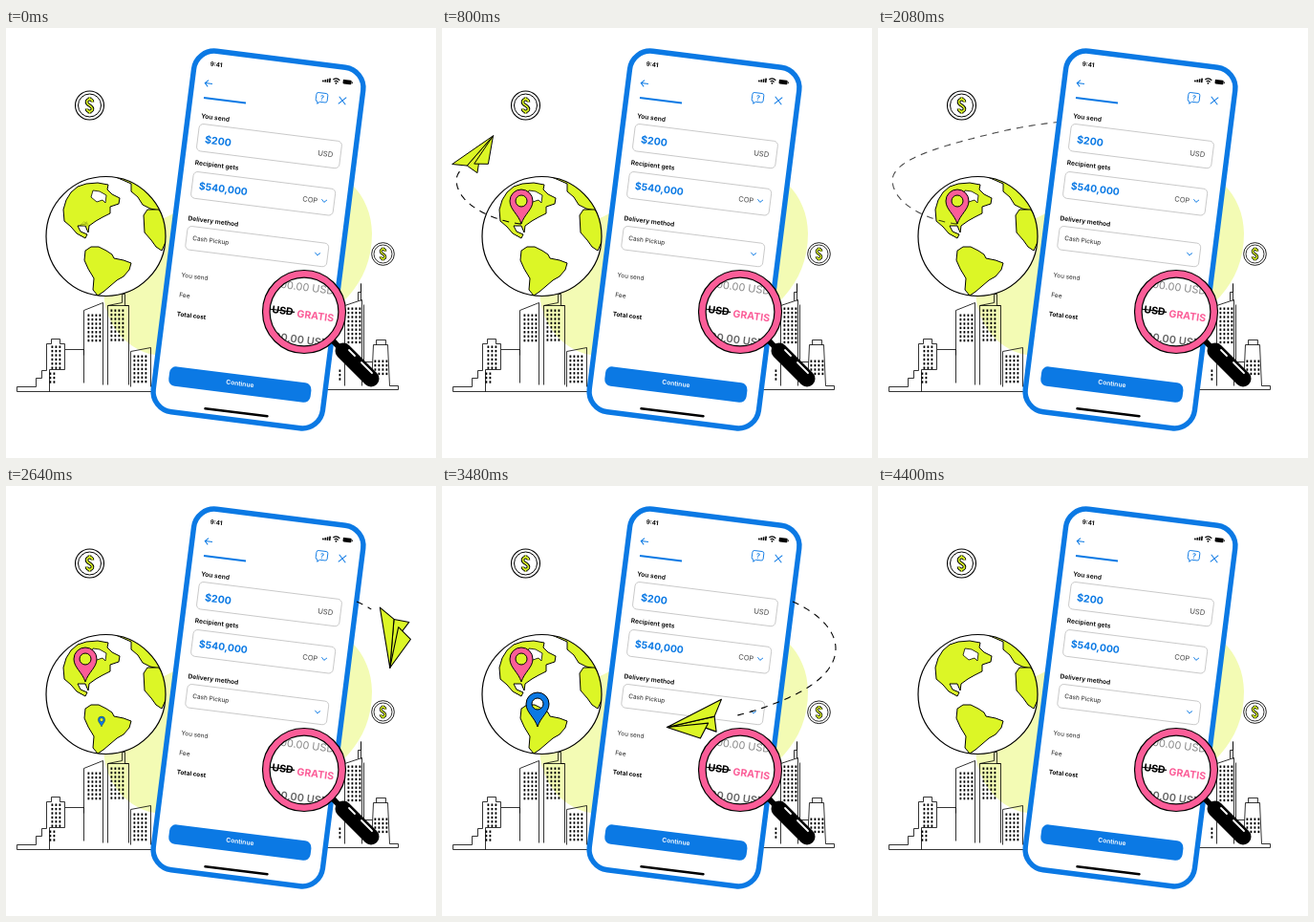
Write an HTML page with a canvas that moves like this. It is 450 px wide and 450 px high and loops after 6 s.

```html
<!DOCTYPE html>
<html lang="en">
<head>
<meta charset="utf-8">
<title>Money transfer</title>
<style>
html, body { margin: 0; width: 100%; height: 100%; overflow: hidden; background: #fff; }
canvas { display: block; width: 450px; height: 450px; }
</style>
</head>
<body>
<canvas id="stage"></canvas>
<script>
const LOOP = 6000;
const BLUE = '#0b79e4', LIME = '#dcf626', PINK = '#fb5d98', PALE = '#f3fbb4', BLACK = '#000';
const TILT = 7.2 * Math.PI / 180;

const canvas = document.getElementById('stage');
const g = canvas.getContext('2d');
const dpr = window.devicePixelRatio || 1;
canvas.width = canvas.height = 450 * dpr;

const clamp = v => Math.max(0, Math.min(1, v));
const ramp = (t, a, b) => clamp((t - a) / (b - a));
const easeOut = u => 1 - (1 - u) ** 3;
const bump = (t, a, b) => Math.sin(Math.PI * ramp(t, a, b)) ** 2;

function at(x, y, angle, scale, draw) {
  g.save();
  g.translate(x, y);
  g.rotate(angle);
  g.scale(scale, scale);
  draw();
  g.restore();
}

function shape(d, fill, line, width = 1, rule = 'nonzero') {
  const p = typeof d === 'string' ? new Path2D(d) : d;
  if (fill) { g.fillStyle = fill; g.fill(p, rule); }
  if (line) { g.strokeStyle = line; g.lineWidth = width; g.stroke(p); }
}

function disc(x, y, r, fill, line, width) {
  const p = new Path2D();
  p.arc(x, y, r, 0, 7);
  shape(p, fill, line, width);
}

function box(x, y, w, h, r, fill, line, width) {
  const p = new Path2D();
  p.roundRect(x, y, w, h, r);
  shape(p, fill, line, width);
}

function label(text, x, y, size, weight, color) {
  at(x, y, TILT, 1, () => {
    g.font = `${weight} ${size}px Inter, sans-serif`;
    g.fillStyle = color;
    g.fillText(text, 0, 0);
  });
}

// Flight path: start time, end time, cubic curve
const legs = [
  [0, 480, 83, 205, 60, 203, 17, 188, 15, 160],
  [480, 1280, 15, 160, 15, 138, 62, 124, 130, 108],
  [1280, 2400, 130, 108, 210, 90, 310, 90, 367, 121],
  [2400, 2730, 367, 121, 392, 132, 412, 150, 412, 170],
  [2730, 3120, 412, 170, 412, 192, 390, 212, 347, 228],
  [3120, 3880, 347, 228, 302, 246, 234, 256, 182, 251],
  [3880, 4260, 182, 251, 150, 252, 125, 251, 100, 250]
];
const HIDDEN = 2400, FRONT = 2700, LANDED = 4260;
const headings = [[0, -175], [300, -140], [480, -80], [800, -33], [1280, 0],
  [2400, 35], [2730, 95], [3120, 143], [3880, 160], [4260, 165]];

function place(t) {
  const [a, b, ...c] = legs.find(l => t <= l[1]) || legs[legs.length - 1];
  const u = ramp(t, a, b), v = 1 - u;
  const mix = i => v * v * v * c[i] + 3 * u * v * v * c[i + 2] + 3 * u * u * v * c[i + 4] + u * u * u * c[i + 6];
  return [mix(0), mix(1)];
}

function heading(t) {
  const i = Math.max(1, headings.findIndex(k => k[0] >= t));
  const [t0, a0] = headings[i - 1], [t1, a1] = headings[i];
  return (a0 + (a1 - a0) * ramp(t, t0, t1)) * Math.PI / 180;
}

function trail(from, to, alpha) {
  if (to <= from || alpha <= 0) return;
  g.save();
  g.globalAlpha = alpha;
  g.setLineDash([7, 6]);
  g.lineWidth = 1.1;
  g.strokeStyle = BLACK;
  g.beginPath();
  for (let t = from; t < to; t += 10) g.lineTo(...place(t));
  g.lineTo(...place(to));
  g.stroke();
  g.restore();
}

function plane(t) {
  const size = Math.min(1, 0.15 + 0.00083 * t) * (1 - ramp(t, 3770, 4280));
  at(...place(t), heading(t), size, () => {
    if (t > 1950) g.scale(1, -1);
    g.lineJoin = 'round';
    shape('M34-13L-15 1L-9 16L-1 7Z', LIME, BLACK, 1.1);
    shape('M34-13L-6 4L9 14Z', LIME, BLACK, 1.1);
    shape('M34-13L-30-11L-15 1Z', LIME, BLACK, 1.1);
  });
}

function pin(x, y, scale, color) {
  if (scale <= 0) return;
  at(x, y, 0, scale, () => {
    shape('M0 0C-3-10-12-15-12-24A12 12 0 1 1 12-24C12-15 3-10 0 0ZM6-24A6 6 0 1 0-6-24A6 6 0 1 0 6-24Z',
      color, BLACK, 1, 'evenodd');
  });
}

function coin(x, y, scale) {
  const dollar = 'M3-3.6C3-7.2-3-7.2-3-3.6C-3 0 3 0 3 3.6C3 7.2-3 7.2-3 3.6M0-8.6V-6M0 6V8.6';
  at(x, y, 0, scale, () => {
    disc(0, 0, 15, '#fff', BLACK, 1.1);
    disc(0, 0, 12, null, BLACK, 1);
    shape(dollar, null, BLACK, 3.6);
    shape(dollar, null, LIME, 1.7);
  });
}

function windows(x, y, cols, rows, dx = 4, dy = 4.4) {
  g.fillStyle = BLACK;
  for (let r = 0; r < rows; r++)
    for (let c = 0; c < cols; c++) g.fillRect(x + c * dx, y + r * dy, 1.8, 2.4);
}

function city() {
  at(-0.5, -0.5, 0, 1, () => {
    shape('M155 381H12V376H32V367H38V359H43V331H48V326H57V331H62V337H82V343M62 337V358H46V381' +
      'M82 372V296L102 288V374M107 374V291L122 288V279H125V291H129V374M107 291H129' +
      'M131 376V339L152 335V376', null, BLACK, 0.8);
    shape('M335 379H411V375H402L400 332H385L383 375M355 375V291L373 285V375M369 286V277H372V268V286' +
      'M375 290V350H384M388 332V327H398V332', null, BLACK, 0.8);
    windows(48, 333, 3, 6);
    windows(46, 361, 2, 3);
    windows(86, 300, 4, 7);
    windows(110, 295, 4, 8);
    windows(134, 343, 4, 7);
    windows(358, 293, 4, 9);
    windows(349, 358, 1, 3);
    windows(386, 348, 4, 4);
  });
}

function globe() {
  g.save();
  disc(104.5, 218, 62.5, '#fff');
  g.beginPath();
  g.arc(104.5, 218, 62.5, 0, 7);
  g.clip();
  g.lineJoin = 'round';
  shape('M61 202L60 190L63 180L68 172L75 166L84 163L96 162L107 164L106 169L111 174L119 178L118 184' +
    'L109 187L109 194L101 198L94 202L87 207L86 214L83 207L75 207L78 213L85 216L83 220L74 215L68 208Z', LIME, BLACK, 1);
  shape('M91 170L89 177L95 182L101 180L104 183L105 175L98 171Z', '#fff', BLACK, 0.8);
  shape('M83 233L89 229L97 229L105 233L111 237L113 241L123 243L131 246L129 253L123 260L116 264' +
    'L109 270L102 276L96 280L91 274L92 262L86 252L82 243Z', LIME, BLACK, 1);
  shape('M110 154L122 159L131 163L131 171L138 177L143 185L151 189L160 191L168 200V180L145 156Z', LIME, BLACK, 1);
  shape('M144 196L148 190L160 190L168 203V222L163 233L157 229L152 222L145 214Z', LIME, BLACK, 1);
  g.restore();
  disc(104.5, 218, 62.5, null, BLACK, 1.2);
}

function field(x, y, w, h) {
  at(x, y, TILT, 1, () => box(0, 0, w, h, 4.5, null, '#aaa', 0.6));
}

function chevron(x, y) {
  at(x, y, TILT, 1, () => shape('M-2.8-1.4L0 1.4L2.8-1.4', null, BLUE, 0.9));
}

function phone() {
  at(264, 221.5, TILT, 1, () => box(-89.3, -190.3, 178.6, 380.6, 21.5, '#fff', BLUE, 5.4));

  label('9:41', 213.5, 39.5, 6.2, 700, BLACK);
  at(331, 56, TILT, 1, () => {
    g.fillStyle = BLACK;
    for (let i = 0; i < 4; i++) g.fillRect(i * 2.3, -1.4 - i, 1.6, 1.6 + i);
    shape('M11-3.4Q14.5-6.6 18-3.4M12.5-1.5Q14.5-3.2 16.5-1.5', null, BLACK, 1.2);
    disc(14.5, 0, 0.9, BLACK);
    box(21.5, -5, 9, 4.6, 1.2, BLACK);
    box(31, -3.6, 0.8, 1.8, 0.4, BLACK);
  });
  at(212, 58, TILT, 1, () => shape('M4 0H-3.6M-.4-3.4L-3.8 0L-.4 3.4', null, BLUE, 1));
  at(330.5, 73, TILT, 1, () => {
    shape('M-4-5H4Q6-5 6-3V2.5Q6 4.5 4 4.5H-1.5L-4 6.8V4.5Q-6 4.5-6 2.5V-3Q-6-5-4-5Z', null, BLUE, 0.9);
  });
  label('?', 328.4, 75.4, 7.5, 600, BLUE);
  at(352, 76, TILT, 1, () => shape('M-3.8-3.8L3.8 3.8M3.8-3.8L-3.8 3.8', null, BLUE, 1));
  shape('M207 73L251 78.6', null, BLUE, 2);

  label('You send', 204, 94.2, 6.7, 600, BLACK);
  field(202.6, 100, 150.5, 28.6);
  label('$200', 207.7, 120.3, 10.6, 700, BLUE);
  label('USD', 326, 133.2, 7.6, 400, '#444');

  label('Recipient gets', 197.5, 143, 6.7, 600, BLACK);
  field(196.6, 150, 149.8, 28);
  label('$540,000', 201.5, 168.8, 10.4, 700, BLUE);
  label('COP', 310, 181.3, 7.5, 400, '#444');
  chevron(333, 181);

  label('Delivery method', 190.3, 201.2, 6.7, 600, BLACK);
  field(190.4, 207, 149, 24.8);
  label('Cash Pickup', 195, 222, 6.5, 400, '#222');
  chevron(326, 236.5);

  label('You send', 183.3, 260.5, 6.4, 400, '#222');
  label('Fee', 181, 281.2, 6.6, 400, '#222');
  label('Total cost', 178.5, 301.2, 6.4, 700, BLACK);

  at(172, 353.5, TILT, 1, () => box(0, 0, 149.5, 20.6, 7, BLUE));
  label('Continue', 230, 372.5, 6.7, 600, '#fff');
  g.lineCap = 'round';
  shape('M208.5 398.3L273.5 406.2', null, BLACK, 2.5);
  g.lineCap = 'butt';
}

function magnifier() {
  g.lineCap = 'round';
  shape('M341 326L354 340', null, BLACK, 6);
  shape('M353 338L382 367', null, BLACK, 17);
  shape('M359 337L365 343M372 350L383 361', null, '#fff', 1.8);
  g.lineCap = 'butt';

  disc(312, 297, 40, '#fff');
  g.save();
  g.beginPath();
  g.arc(312, 297, 37, 0, 7);
  g.clip();
  label('200.00 USD', 280, 271, 11, 400, '#888');
  label('USD', 278, 298, 10.6, 700, BLACK);
  shape('M275 294L302 297.4', null, BLACK, 1.2);
  label('GRATIS', 304, 302.5, 10.6, 700, PINK);
  label('200.00 USD', 273, 325.5, 11, 600, '#666');
  g.restore();
  disc(312, 297, 39.7, null, BLACK, 8.8);
  disc(312, 297, 39.7, null, PINK, 6.4);
}

function draw(t) {
  g.setTransform(dpr, 0, 0, dpr, 0, 0);
  g.fillStyle = '#fff';
  g.fillRect(0, 0, 450, 450);

  shape('M150 341C112 330 92 285 108 252C135 200 190 190 290 145C340 133 383 168 383 215' +
    'C383 270 345 300 300 320C250 340 200 352 150 341Z', PALE);
  city();
  globe();
  coin(87.5, 81 - 17 * bump(t, 880, 1680), 1);
  coin(394.5, 236.5 + 12 * bump(t, 2720, 3520), 0.79);

  const tail = t - 170;
  trail(0, Math.min(tail, HIDDEN), 1 - ramp(t, 1920, 2480));
  const leave = 1 - ramp(t, 4000, 4360);
  pin(83, 205, easeOut(ramp(t, 40, 400)) * leave, PINK);
  pin(100, 252, easeOut(ramp(t, 2600, 2960)) * leave, BLUE);
  if (t < FRONT) plane(t);

  phone();
  trail(HIDDEN, Math.min(tail, LANDED), 1 - ramp(t, 3960, 4360));
  magnifier();
  if (t >= FRONT && t < LANDED) plane(t);
}

function tick() {
  draw(performance.now() % LOOP);
  requestAnimationFrame(tick);
}
tick();
</script>
</body>
</html>
```
